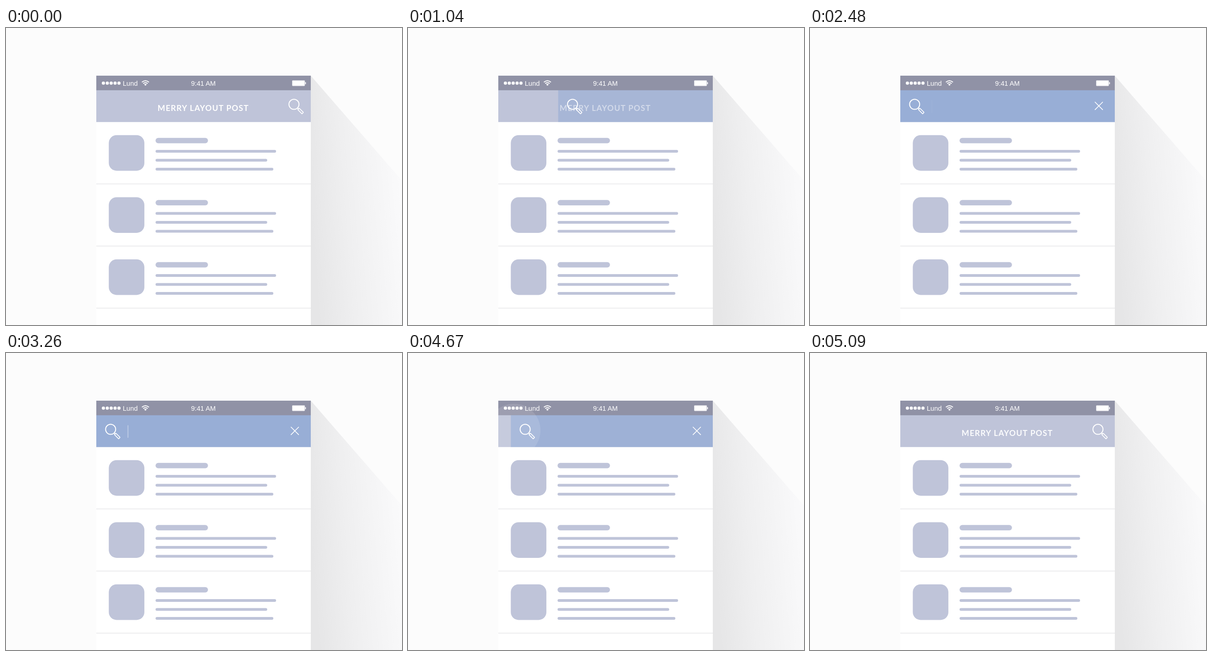
An HTML page for the animation above (6380 ms loop, 864 by 648 pixels).

```html
<!DOCTYPE html>
<html lang="en">
<head>
<meta charset="utf-8">
<title>Search bar interaction</title>
<style>
  html, body { margin: 0; width: 100%; height: 100%; overflow: hidden; background: #fcfcfc; }
  svg { display: block; width: 100%; height: 100%; }
  .status { font: 14.7px "Liberation Sans", Arial, sans-serif; fill: #fff; }
  #title { font: bold 17.3px Lato, sans-serif; letter-spacing: 1.25px; text-anchor: middle; fill: #fff; }
  .line { fill: none; stroke: #fff; }
</style>
</head>
<body>
<svg viewBox="0 0 864 648">
  <defs>
    <linearGradient id="shade" gradientUnits="userSpaceOnUse" x1="665" y1="400" x2="864" y2="385">
      <stop offset="0" stop-color="#e6e6e7"/>
      <stop offset=".4" stop-color="#efeff0"/>
      <stop offset="1" stop-color="#fafafb"/>
    </linearGradient>
    <clipPath id="aboveList"><rect width="864" height="205"/></clipPath>
    <g id="row" fill="#bfc4d9">
      <rect x="224.3" y="233.8" width="77.6" height="77.6" rx="17"/>
      <rect x="326.3" y="239.8" width="114.4" height="11.6" rx="5.8"/>
      <rect x="326.3" y="266" width="263" height="6" rx="3"/>
      <rect x="326.3" y="285.5" width="243.6" height="6" rx="3"/>
      <rect x="326.3" y="305" width="257" height="6" rx="3"/>
      <rect x="197" y="339.6" width="468" height="1.2" fill="#e2e2e4"/>
    </g>
  </defs>

  <path d="M665 104L864 333V648H665Z" fill="url(#shade)"/>
  <rect x="197" y="104" width="468" height="544" fill="#fff"/>
  <use href="#row"/>
  <use href="#row" y="135.5"/>
  <use href="#row" y="271"/>

  <rect x="197" y="135" width="468" height="70.2" fill="#bfc4d9"/>
  <g id="bar">
    <rect id="barFill" y="135" height="70.2" fill="#98aed6"/>
  </g>
  <rect x="197" y="104" width="468" height="31.8" fill="#9092a6"/>

  <path d="M212.5 120.3H250" stroke="#fff" stroke-width="7" stroke-linecap="round" stroke-dasharray="0 8.5"/>
  <text class="status" x="254.7" y="126">Lund</text>
  <g class="line" stroke-width="2">
    <path d="M296.5 118.3Q304.2 111.8 311.9 118.3M299.3 121.2Q304.2 117.2 309.1 121.2"/>
    <path d="M304.2 126L301.4 123.2Q304.2 121 307 123.2Z" fill="#fff" stroke="none"/>
  </g>
  <text class="status" x="403.7" y="126">9:41 AM</text>
  <rect x="624.6" y="114.6" width="27.2" height="11.6" rx="1" fill="#fff" stroke="#d5d6de"/>
  <rect x="652.4" y="118" width="2" height="4.8" rx="1" fill="#fff"/>

  <text id="title" x="430.5" y="181">MERRY LAYOUT POST</text>
  <path id="cross" class="line" stroke-width="1.6" d="M621.5 161.2l17.4 17.4m0-17.4l-17.4 17.4"/>
  <rect id="cursor" x="265" y="157.7" width="2.2" height="27.2" fill="#fff"/>
  <g clip-path="url(#aboveList)"><circle id="tap" cy="168.8" fill="#fff"/></g>
  <g id="lens" class="line" stroke-width="2">
    <circle cx="628.3" cy="166.6" r="11"/>
    <path d="M636 174.4l2.6 2.6"/>
    <rect x="-1" y="-2.2" width="13" height="4.4" rx=".6" stroke-width="1.7" transform="translate(638.8 177.2) rotate(45)"/>
  </g>
</svg>
<script>
const LOOP = 6380, TRAVEL = 400, LEFT = 197, RIGHT = 665;
const el = id => document.getElementById(id);
const [bar, barFill, title, cross, cursor, tap, lens] =
  ['bar', 'barFill', 'title', 'cross', 'cursor', 'tap', 'lens'].map(el);

const ramp = (t, start, end) => Math.min(1, Math.max(0, (t - start) / (end - start)));
const smooth = u => u * u * (3 - 2 * u);
const inOut = u => u < .5 ? 4 * u ** 3 : 1 - 4 * (1 - u) ** 3;
const opacity = (node, value) => node.setAttribute('opacity', value);

// Start and end of each visible phase: fade in, then fade out
const BLINKS = [[1490, 1730, 1910, 2330], [2450, 2690, 2960, 3500], [3590, 3830, 4310, 4550]];
const TAPS = [
  { x: 630.5, down: 150, shown: 240, release: 680, gone: 920, radius: 38.5, grow: 15.5 },
  { x: 231, down: 4070, shown: 4190, release: 4310, gone: 4790, radius: 37.5, grow: 22 }
];

function drawTap(t) {
  const touch = TAPS[t < 2500 ? 0 : 1];
  const appear = ramp(t, touch.down, touch.shown);
  const leave = ramp(t, touch.release, touch.gone);
  const spread = 1 - (1 - leave) ** 2;
  tap.setAttribute('cx', touch.x);
  tap.setAttribute('r', touch.radius * (.8 + .2 * appear) + touch.grow * spread);
  opacity(tap, .46 * appear * (1 - leave));
}

function draw(t) {
  const opening = ramp(t, 720, 1287), closing = ramp(t, 4525, 5092);
  const open = inOut(opening) - inOut(closing);
  const edge = LEFT + TRAVEL * (1 - open);
  lens.setAttribute('transform', `translate(${-TRAVEL * open} 0)`);
  barFill.setAttribute('x', edge);
  barFill.setAttribute('width', RIGHT - edge);
  opacity(bar, smooth(opening) - smooth(closing));
  opacity(title, 1 - smooth(ramp(t, 720, 1360)) + .95 * smooth(ramp(t, 4670, 5090)));
  opacity(cross, ramp(t, 1130, 1340) - smooth(ramp(t, 4640, 5090)));
  opacity(cursor, .75 * BLINKS.reduce((sum, [a, b, c, d]) =>
    sum + smooth(ramp(t, a, b)) - smooth(ramp(t, c, d)), 0));
  drawTap(t);
}

const begin = performance.now();
function tick() {
  draw((performance.now() - begin) % LOOP);
  requestAnimationFrame(tick);
}
tick();
</script>
</body>
</html>
```
